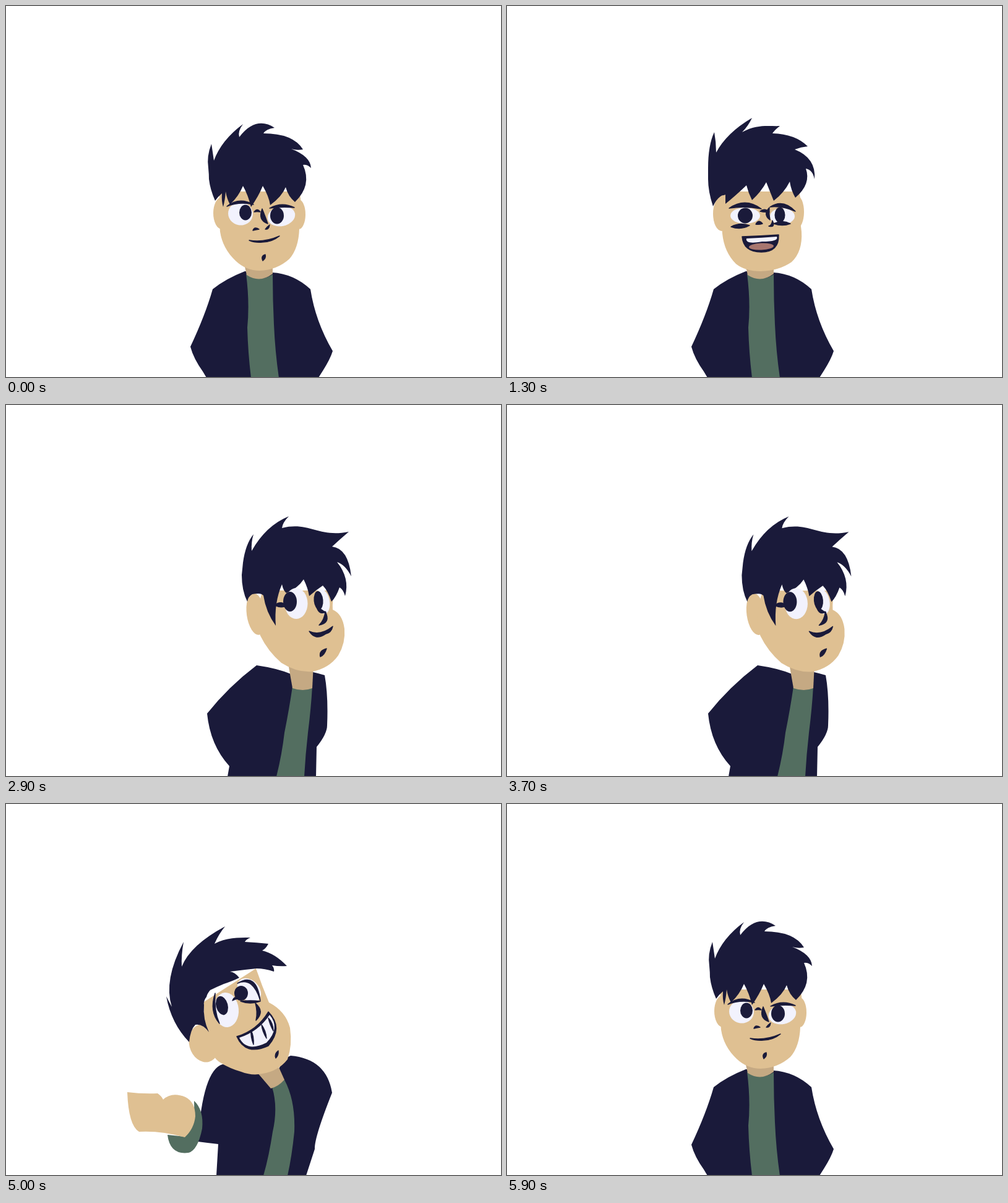
These frames come from a looping animation (800 px wide and 600 px high, 6 s). An HTML page with a canvas:

```html
<!DOCTYPE html>
<html lang="en">
<head>
<meta charset="utf-8">
<style>
html, body { margin: 0; width: 100%; height: 100%; overflow: hidden; background: #fff; }
canvas { display: block; }
</style>
</head>
<body>
<canvas id="stage" width="800" height="600"></canvas>
<script>
const ctx = document.getElementById('stage').getContext('2d');
const INK = '#1a1a3a', SKIN = '#dfc092', SHADE = '#c5a983', GREEN = '#536e60', WHITE = '#f2f2fd', TONGUE = '#a8766f';
const NUM = /-?\d+(\.\d+)?/g;

// Blobs are "x y rx ry degrees"; ticks are tapered strokes "x1 y1 cx cy x2 y2 width".
const calm = {
  jacket: 'M386 429Q355 441 334 458 322 500 298 551 303 570 318 591L324 601 505 601 512 590Q524 571 528 558 500 510 492 458 465 433 430 431Z',
  shirt: 'M388 433Q394 480 390 520 391 560 396 601L441 601Q435 560 433 515 431 475 431 434 410 448 388 433Z',
  neck: 'M386 422L431 422 431 433Q410 449 389 435Z',
  face: 'M345 300Q344 340 346 365 350 392 371 412 388 428 410 428 438 427 458 409 473 392 474 360 476 345 476 335 478 315 474 300Z',
  earL: '349 335 14 26 0', earR: '473 337 11 24 0',
  hair: 'M338 315Q330 297 328 280 328 272 327 262 324 243 332 223 334 236 336 250 348 217 383 191 374 203 377 212' +
    'C395 188 415 184 434 197Q420 199 416 206 464 206 480 232 470 234 461 231 492 243 493 262 487 256 480 257' +
    ' 495 290 467 317 456 308 452 293 446 308 427 322 425 308 415 291 408 308 396 325 391 305 383 291 376 308 362 321' +
    ' 357 312 355 300 354 314 351 325 348 315 349 303 343 308 338 315Z',
  eyeL: '379 336 20 18.5 10', eyeR: '445 340 22.5 16 -12',
  pupilL: '387 334 10 12.5 0', pupilR: '438 339 11 13.5 0',
  lidL: '357 324 377 312 400 321 4', lidR: '426 327 446 320 466 326 4',
  bridge: '401 333 406 329 411 333 3', rim: '414 328 413 344 423 352 7',
  nostril: '399 363 402 359 409 361 3', nose: '419 361 423 360 426 354 3',
  chin: '415 412 416 406 419 402 5',
  mouth: 'M393 379Q417 383 442 372 430 382 414 382 402 383 393 379Z'
};

const talk = {
  jacket: calm.jacket, shirt: calm.shirt, neck: calm.neck,
  face: 'M345 300Q346 340 348 368 351 398 370 417 385 429 410 429 440 428 460 414 478 397 476 365 474 352 474 340 477 320 472 300Z',
  earL: '347 336 14 28 0', earR: '469 333 11 26 0',
  hair: 'M333 324Q325 300 325 280 325 272 325 262 325 225 335 204 338 220 338 237 355 205 396 181 390 194 380 204' +
    'C405 190 425 195 441 194Q433 200 429 206 466 207 486 227 475 228 465 232 500 246 497 280 494 265 483 263' +
    ' 492 288 466 310 459 298 457 284 448 302 431 315 425 300 419 285 411 300 396 314 390 302 387 290 368 308 353 320' +
    ' 353 312 353 305 351 306 350 306 347 306 345 308 338 313 333 324Z',
  eyeL: '385 339 24 13 0', eyeR: '445 340 20 13 0',
  pupilL: '385 339 12 12.5 0', pupilR: '441 338 8.5 12.5 0',
  lidL: '359 327 385 316 411 328 7', lidR: '425 325 445 317 466 332 6',
  bridge: '409 332 416 330 424 333 4', rim: '424 326 418 337 425 346 5',
  nostril: '402 353 407 349 413 352 5', nose: '423 356 431 357 429 347 4',
  bagL: '362 357 377 356 392 355 7', bagR: '431 352 445 351 458 352 6',
  mouth: 'M380 373Q410 372 439 370 440 398 411 398 382 398 380 373Z',
  teeth: 'M387 376Q412 375 436 373 440 381 412 381 385 386 387 376Z',
  tongue: '411 389 20 5.5 -3'
};

const lean = {
  jacket: 'M365 472Q340 466 325 471 310 508 295 540 285 565 277 584L270 601 507 601 513 582Q521 555 526 540 531 525 530 515 525 510 515 505Z',
  shirt: 'M410 515Q402 540 393 560 384 582 375 601L436 601Q447 580 460 560 472 540 486 524 450 530 410 515Z',
  face: 'M345 350Q336 420 348 455 358 485 385 503 415 526 445 527 485 528 515 514 545 490 552 460 552 438 540 430 545 395 553 360Z',
  earL: '344 412 10 41 0',
  hair: 'M333 430Q326 395 327 365 328 355 329 340 340 290 358 250 354 275 352 294 375 244 447 223 430 232 414 246' +
    'C470 236 520 268 570 256Q556 274 537 276 556 283 565 297 566 299 567 302 578 330 574 362 566 352 561 342' +
    ' 549 385 512 403 527 390 529 365 508 402 479 405 486 375 475 367 458 388 435 403 425 385 417 358 408 378 401 389' +
    ' 392 372 385 358 362 390 355 430 357 372 345 370 335 372 333 430Z',
  eyeL: '423 437 36 17 10', eyeR: '510 433 30 18 -32',
  pupilL: '444 440 13 15 0', pupilR: '515 426 12 17 20',
  lidL: '384 415 425 406 461 436 8', lidR: '480 440 500 410 531 407 6',
  bridge: '466 445 471 440 480 442 3', rim: '480 440 478 449 486 451 4',
  nose: '471 475 507 473 493 453 7',
  mouth: 'M403 484Q455 504 501 487 480 501 457 500 430 499 403 484Z'
};

const side = {
  jacket: 'M463 436Q440 426 405 421 360 455 325 499 330 550 361 584L358 601 501 601 502 553Q519 532 519 518 521 470 515 437 505 434 496 432Z',
  shirt: 'M463 455Q458 490 450 530 446 565 437 601L482 601Q484 565 488 530 493 490 495 455 480 463 463 455Z',
  neck: 'M456 418L497 418 495 458Q480 464 463 458Z',
  face: 'M415 300Q400 345 411 373 423 398 445 417 470 433 495 431 522 426 537 405 549 385 547 362 544 338 528 331 527 318 531 300Z',
  earL: '404 338 15 34 -8',
  hair: 'M390 318Q381 300 381 275 382 265 383 255 387 225 400 209 396 222 397 236 420 195 457 180 447 190 446 199' +
    'C490 188 505 215 554 205Q541 216 527 229 553 232 558 277 548 258 535 254 556 280 548 309 545 298 539 295' +
    ' 534 310 526 318 520 300 512 292 500 300 490 309 488 296 481 282 472 296 453 304 448 300 446 290 433 320 436 357' +
    ' 420 335 416 308 413 305 408 305 402 305 398 306 391 310 390 318Z',
  eyeL: '469 321 18.5 25 0', eyeR: '512 318 11 20 -10',
  pupilL: '459 318 11 16 0', pupilR: '505 316 7.5 15 -5',
  lidR: '501 322 507 337 517 335 5', bridge: '434 324 444 322 454 325 7',
  nose: '516 334 520 350 506 356 6', chin: '508 407 510 401 518 394 6',
  mouth: 'M490 366Q508 374 528 358 526 368 517 370 500 382 490 366Z'
};

const doze = {
  jacket: 'M421 436Q400 405 380 413 350 418 297 505 310 545 339 574L334 601 480 601 480 580Q502 560 506 545 507 500 511 459 490 465 475 470Z',
  shirt: 'M422 465Q414 510 403 550 398 580 394 601L440 601Q442 570 452 530 460 495 476 468 450 482 422 465Z',
  neck: 'M423 445L475 460 475 471Q448 484 422 468Z',
  face: 'M415 330Q395 365 403 393 408 425 424 446 445 466 475 467 500 466 513 457 531 440 536 415 540 390 524 380 524 365 535 345Z',
  earL: '404 361 16 34 0',
  hair: 'M389 347Q384 330 385 310 386 302 388 293 402 262 409 237 417 248 418 262 435 238 450 217 452 228 451 239' +
    'C480 212 510 240 549 233Q540 245 524 248 538 260 545 273 547 276 548 280 561 305 554 325 554 312 545 307' +
    ' 548 350 535 377 538 350 530 333 512 352 499 360 505 342 500 332 486 347 468 350 467 340 462 326 445 340 432 357' +
    ' 431 353 430 349 424 352 418 383 420 360 419 340 405 315 389 347Z',
  lidL: '444 368 460 372 477 385 9', lidR: '483 385 505 388 526 380 4',
  rim: '499 370 493 388 501 402 9', nose: '488 408 498 407 502 401 4',
  temple: '428 354 436 355 441 368 10', chin: '471 453 477 450 481 445 5',
  mouth: 'M449 412Q470 428 495 427 492 436 478 436 464 434 449 412Z'
};

const grin = {
  jacket: 'M428 455Q412 428 350 421 318 430 310 546 325 548 343 550L340 601 485 601 499 558Q501 537 504 533 528 492 527 467 518 412 460 407 450 410 441 428Z'
    .replace('Q501 537 504 533 528 492 527 467', 'Q498 540 527 467'),
  shirt: 'M430 458Q440 490 431 530 425 570 416 601L455 601Q462 570 466 530 468 480 450 446 440 456 430 458Z',
  neck: 'M405 433L441 426 450 446Q440 457 428 460Z',
  face: 'M320 320Q318 400 346 418 362 428 380 433 398 440 415 436 440 432 455 413 463 390 459 362 452 335 425 321 414 295 404 266Z',
  earL: '320 387 24 31 -15',
  hair: 'M296 385Q267 355 259 311 264 321 268 328 254 285 287 223 283 245 284 263 298 228 354 198 344 210 337 226' +
    'C355 216 375 216 395 216Q388 219 386 223 405 224 424 226 420 234 414 237 435 242 454 262 442 263 430 261' +
    ' 434 266 433 271 418 266 405 266 385 268 362 271 370 272 377 281 367 286 352 291 340 296 330 301 325 307 324 312' +
    ' 319 318 320 325 318 348 328 369 318 355 306 357 298 365 296 385Z',
  eyeL: '356 333 20 28 -5', eyeR: '393 301 22 16 45',
  pupilL: '349 326 9.5 15.5 -15', pupilR: '380 306 11 12 0',
  lidL: '338 306 332 335 345 355 4', lidR: '374 290 402 275 411 318 5',
  rim: '379 319 395 321 411 319 4', bridge: '366 318 370 312 376 315 3',
  nose: '403 322 413 336 404 350 6', chin: '436 411 437 405 440 399 4',
  mouth: 'M373 376Q406 366 424 336 449 362 424 391 387 408 373 376Z',
  teeth: 'M377 378Q408 368 426 341 444 362 421 386 389 402 377 378Z',
  gapA: '396 366 398 376 400 389 3', gapB: '413 357 417 367 421 379 3', gapC: '424 346 429 355 432 367 3',
  handL: 'M196 466Q220 469 245 468 251 472 254 478 268 465 290 474 306 482 306 505 304 525 289 539 250 528 215 530 198 520 196 466Z',
  cuffL: 'M304 480Q320 495 317 525 310 560 295 564 265 568 261 535L289 538Q306 520 304 480Z'
};

const mirror = path => {
  let i = 0;
  return path.replace(NUM, n => i++ % 2 ? n : 846 - n);
};
const shrug = { ...talk, handL: grin.handL, cuffL: grin.cuffL, handR: mirror(grin.handL), cuffR: mirror(grin.cuffL) };

// time, pose, head x, head y, body x
const keys = [
  [0, calm, 0, 0, 0], [600, talk, -1, 3, 0], [900, talk, 0, -3, 0], [1200, talk, 0, 0, 0], [1300, talk, 0, 0, 0],
  [1600, talk, -32, -15, -50], [2000, lean, 0, 3, 0], [2100, lean, 0, 0, 0], [2300, lean, 10, 2, 0],
  [2800, side, 1, -1, 0], [2900, side, 0, 0, 0], [3300, side, 2, 2, 0], [3800, side, -2, 0, 0], [4200, side, 0, 0, 0],
  [4400, doze, 0, 0, 0], [4600, doze, 0, 2, 0], [4900, grin, -4, 0, -6], [5000, grin, 0, 0, 0], [5200, grin, 2, 1, 0],
  [5400, shrug, 0, 0, 0], [5600, shrug, 0, 3, 0], [5900, calm, 0, 0, 0], [6000, calm, 0, 0, 0]
];

function mix(a, b, t) {
  if (a === b) return a;
  const to = b && b.match(NUM);
  if (!a || !b || a.match(NUM).length !== to.length) return t < 0.5 ? a : b;
  let i = 0;
  return a.replace(NUM, n => (+n + (to[i++] - n) * t).toFixed(2));
}

const shapes = {
  path: s => new Path2D(s),
  blob(s) {
    const [x, y, rx, ry, turn] = s.split(' ').map(Number);
    const p = new Path2D();
    p.ellipse(x, y, rx, ry, turn * Math.PI / 180, 0, 7);
    return p;
  },
  tick(s) {
    const [x1, y1, cx, cy, x2, y2, w] = s.split(' ').map(Number);
    const len = Math.hypot(x2 - x1, y2 - y1) || 1;
    const nx = (y1 - y2) / len * w, ny = (x2 - x1) / len * w;
    return new Path2D(`M${x1} ${y1}Q${cx + nx} ${cy + ny} ${x2} ${y2}Q${cx - nx} ${cy - ny} ${x1} ${y1}Z`);
  }
};

const bodyParts = [
  ['path', INK, 'jacket'], ['path', GREEN, 'shirt'], ['path', SHADE, 'neck'],
  ['path', GREEN, 'cuffL cuffR'], ['path', SKIN, 'handL handR']
];
const headParts = [
  ['blob', SKIN, 'earL earR'], ['path', SKIN, 'face'], ['path', INK, 'hair'],
  ['blob', WHITE, 'eyeL eyeR'], ['blob', INK, 'pupilL pupilR'],
  ['tick', INK, 'lidL lidR bridge rim temple nostril nose bagL bagR chin'],
  ['path', INK, 'mouth'], ['path', WHITE, 'teeth'], ['blob', TONGUE, 'tongue'], ['tick', INK, 'gapA gapB gapC']
];

function drawParts(parts, a, b, t, dx, dy) {
  ctx.setTransform(1, 0, 0, 1, dx, dy);
  for (const [kind, color, names] of parts) {
    ctx.fillStyle = ctx.strokeStyle = color;
    for (const name of names.split(' ')) {
      const form = mix(a[name], b[name], t);
      if (!form) continue;
      const shape = shapes[kind](form);
      ctx.fill(shape);
      if (kind === 'tick' || name === 'mouth') ctx.stroke(shape);
    }
  }
}

function draw(time) {
  const next = keys.findIndex(k => k[0] > time);
  const a = keys[next - 1], b = keys[next];
  const u = (time - a[0]) / (b[0] - a[0]);
  const t = u * u * (3 - 2 * u);
  const at = i => a[i] + (b[i] - a[i]) * t;
  ctx.setTransform(1, 0, 0, 1, 0, 0);
  ctx.fillStyle = '#fff';
  ctx.fillRect(0, 0, 800, 600);
  ctx.lineWidth = 1.4;
  ctx.lineJoin = 'round';
  drawParts(bodyParts, a[1], b[1], t, at(4), 0);
  drawParts(headParts, a[1], b[1], t, at(2), at(3));
}

const start = performance.now();
function tick() {
  const elapsed = Math.max(0, performance.now() - start) % 6000;
  draw(Math.floor(elapsed / 100) * 100);
  requestAnimationFrame(tick);
}
tick();
</script>
</body>
</html>
```
